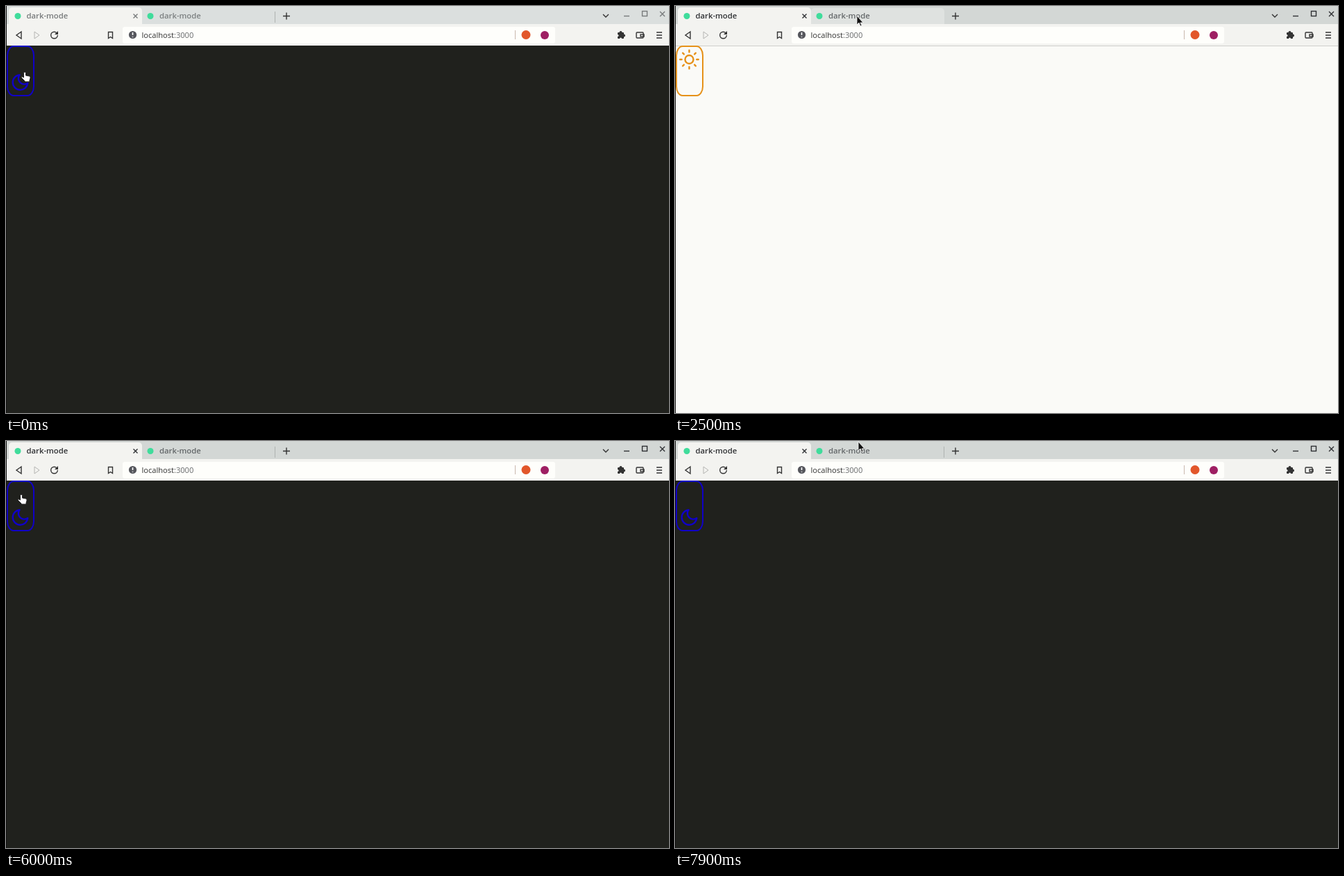
These frames come from a looping animation (955 by 586 pixels, 8000 ms). An HTML page:

```html
<!DOCTYPE html>
<html lang="en">
<head>
<meta charset="utf-8">
<title>dark-mode</title>
<style>
  html, body { margin: 0; width: 100%; height: 100%; overflow: hidden; }
  svg { display: block; }
  text { font: 11.1px "Open Sans", "Noto Sans", sans-serif; }
  .title { font-size: 11.3px; font-weight: 600; }
  .line { fill: none; stroke: #333; stroke-width: 1.4; }
  .control { fill: none; stroke: var(--ink); stroke-width: 1.4; }
  #window { --strip: #d3d7d5; --ink: #2e3033; --tab: #64686a; }
  #window.blurred { --strip: #dbdfde; --ink: #777a7b; --tab: #7c8081; }
  #page { --bg: #fafaf7; --accent: #e69119; --edge: #cfcfcc; }
  #page.dark { --bg: #20211d; --accent: #1000c8; --edge: #20211d; }
  .accent { fill: none; stroke: var(--accent); stroke-width: 2; stroke-linecap: round; stroke-linejoin: round; }
</style>
</head>
<body>
<svg width="955" height="586">
  <defs>
    <path id="cross" d="M-1-1L1 1M1-1L-1 1" vector-effect="non-scaling-stroke"/>
    <circle id="dot" r="4.5" fill="#3fdc9b"/>
  </defs>

  <g id="window">
    <rect width="955" height="26" fill="var(--strip)"/>
    <rect id="tabHover" x="196" y="3" width="192" height="30" rx="5" fill="#dfe2e0"/>
    <rect x="4" y="2" width="192" height="30" rx="5" fill="#f3f3f0"/>
    <use id="icon" href="#dot" transform="translate(17 14.5)"/>
    <circle id="spinner" cx="17" cy="14.5" r="5.8" pathLength="4" stroke-dasharray="3 1" fill="none" stroke="#d9423c" stroke-width="1.6"/>
    <text class="title" x="29.5" y="18.3" fill="var(--ink)">dark-mode</text>
    <use href="#dot" transform="translate(208 14.5)"/>
    <text class="title" x="221" y="18.3" fill="var(--tab)">dark-mode</text>
    <path id="divider" d="M387.5 8v16" stroke="#aeb2b0"/>
    <use href="#cross" class="control" transform="translate(186.5 14.5) scale(3)"/>
    <path class="line" d="M399 14.5h10m-5-5v10"/>
    <path class="line" d="M860 12l4 4 4-4"/>
    <path class="control" d="M890 14.5h8"/>
    <rect class="control" x="916.5" y="7.500" width="7" height="7"/>
    <use href="#cross" class="control" transform="translate(945.5 11.5) scale(3.5)"/>
  </g>

  <g id="toolbar">
    <rect y="26" width="955" height="32" fill="#f3f3f0"/>
    <path class="line" d="M22 37v10l-7-5z"/>
    <path d="M41 37v10l7-5z" fill="none" stroke="#b4b4b2"/>
    <rect id="reloadHover" x="59" y="31" width="21" height="21" rx="3" fill="#dededb"/>
    <g id="reload">
      <circle class="line" cx="69.500" cy="42" r="4.800" pathLength="8" stroke-dasharray="7 1"/>
      <path d="M75 36v5h-5z" fill="#333"/>
    </g>
    <use id="stop" href="#cross" class="line" transform="translate(69.500 42) scale(5)"/>
    <path class="line" d="M147.500 37.500h6v9l-3-2-3 2z"/>
    <rect x="168" y="30" width="623" height="24" rx="3" fill="#fefefb"/>
    <circle cx="182.500" cy="41.500" r="5.600" fill="#55565c"/>
    <path d="M182.500 38v4m0 2v1" stroke="#fff" stroke-width="1.600"/>
    <text x="195.500" y="45.500" fill="#333">localhost<tspan fill="#66686a">:3000</tspan></text>
    <path d="M733.500 35v13" stroke="#c9b9ad"/>
    <circle cx="749" cy="41.500" r="6.500" fill="#e2572b"/>
    <circle cx="776" cy="42" r="6" fill="#9e1f63"/>
    <g fill="#333">
      <rect x="881" y="38" width="9" height="9" rx="1"/>
      <circle cx="885.500" cy="38" r="2"/>
      <circle cx="890" cy="42.500" r="2"/>
      <circle cx="881" cy="42.500" r="1.500" fill="#f3f3f0"/>
      <circle cx="885.500" cy="47" r="1.500" fill="#f3f3f0"/>
    </g>
    <rect class="line" x="908" y="38" width="10" height="8" rx="1"/>
    <rect class="line" x="914" y="41" width="5" height="3"/>
    <path class="line" d="M937 38h8m-8 4h8m-8 4h8"/>
  </g>

  <g id="page">
    <rect y="57" width="955" height="529" fill="var(--bg)"/>
    <path d="M0 57.500h955" stroke="var(--edge)"/>
    <rect class="accent" x="2" y="58" width="38" height="71" rx="9" ry="13"/>
    <g id="sun" class="accent" transform="translate(20.500 77) scale(1.200)"><circle r="5"/></g>
    <path id="moon" class="accent" transform="translate(20.500 110) scale(1.200)" d="M9 .8A9 9 0 1 1-.8-9A7 7 0 0 0 9 .8z"/>
  </g>
  <path d="M.5 0v586" stroke="#111"/>

  <path id="arrow" d="M0 0v13l3-3 2 5 2-1-2-4h4z" fill="#111" stroke="#fff" stroke-width=".8"/>
  <path id="hand" d="M-1.500 8V1.500a1.400 1.400 0 0 1 3 0V5l5 1q2 0 1.500 3l-1 3v2h-7v-1l-5-5q0-2 2-1z" fill="#fff" stroke="#222" stroke-linejoin="round"/>
</svg>
<script>
const LOOP = 8000, STEP = 100;
const $ = id => document.getElementById(id);
const show = (id, on) => { $(id).style.display = on ? '' : 'none'; };
const between = (v, a, b) => v >= a && v < b;
const ease = k => k * k * (3 - 2 * k);

// Each move eases the pointer from where it rests to a new place.
const START = { x: 27, y: 95 };
const moves = [
  { from: 0, to: 300, x: 18, y: 101 },
  { from: 900, to: 1500, x: 27, y: 103 },
  { from: 1600, to: 2400, x: 262, y: 14 },
  { from: 2500, to: 3000, x: 70, y: 42 },
  { from: 3300, to: 3800, x: 111, y: 121 },
  { from: 4000, to: 5200, x: 24, y: 103 },
  { from: 5300, to: 5700, x: 22, y: 77 },
  { from: 6000, to: 6900, x: 70, y: 42 },
  { from: 7300, to: 7500, x: 185, y: 45 },
  { from: 7500, to: 7900, x: 264, y: 1 }
];

function pointer(t) {
  let { x, y } = START;
  for (const m of moves) {
    const k = ease(Math.min(1, Math.max(0, (t - m.from) / (m.to - m.from))));
    x += (m.x - x) * k;
    y += (m.y - y) * k;
  }
  return [Math.round(x), Math.round(y)];
}

for (let a = 0; a < 360; a += 45) {
  $('sun').insertAdjacentHTML('beforeend', `<path d="M0 9v2" transform="rotate(${a})"/>`);
}

function draw(now) {
  const t = Math.floor(now % LOOP / STEP) * STEP;
  const [x, y] = pointer(t);
  const firstLoad = between(t, 3200, 4600);
  const loading = firstLoad || between(t, 6900, 7900);
  // The reloaded page paints light briefly before the stored theme applies.
  const light = between(t, 1000, 6000) || between(t, 7700, 7800);
  const overToggle = between(x, 1, 41) && between(y, 58, 130);
  const overTab = between(x, 196, 388) && between(y, 4, 26);
  const overReload = between(x, 60, 80) && between(y, 32, 52);

  $('window').classList.toggle('blurred', t < 900);
  $('page').classList.toggle('dark', !light);
  show('sun', light);
  show('moon', !light);
  show('tabHover', overTab);
  show('divider', !overTab);
  show('reloadHover', overReload || firstLoad);
  show('reload', !loading);
  show('stop', loading);
  show('spinner', loading);
  $('spinner').setAttribute('transform', `rotate(${t * .36} 17 14.5)`);
  $('icon').setAttribute('transform', `translate(17 14.5) scale(${loading ? .65 : 1})`);
  show('hand', overToggle);
  show('arrow', !overToggle);
  $(overToggle ? 'hand' : 'arrow').setAttribute('transform', `translate(${x} ${y})`);
  requestAnimationFrame(() => draw(performance.now()));
}
draw(0);
</script>
</body>
</html>
```
